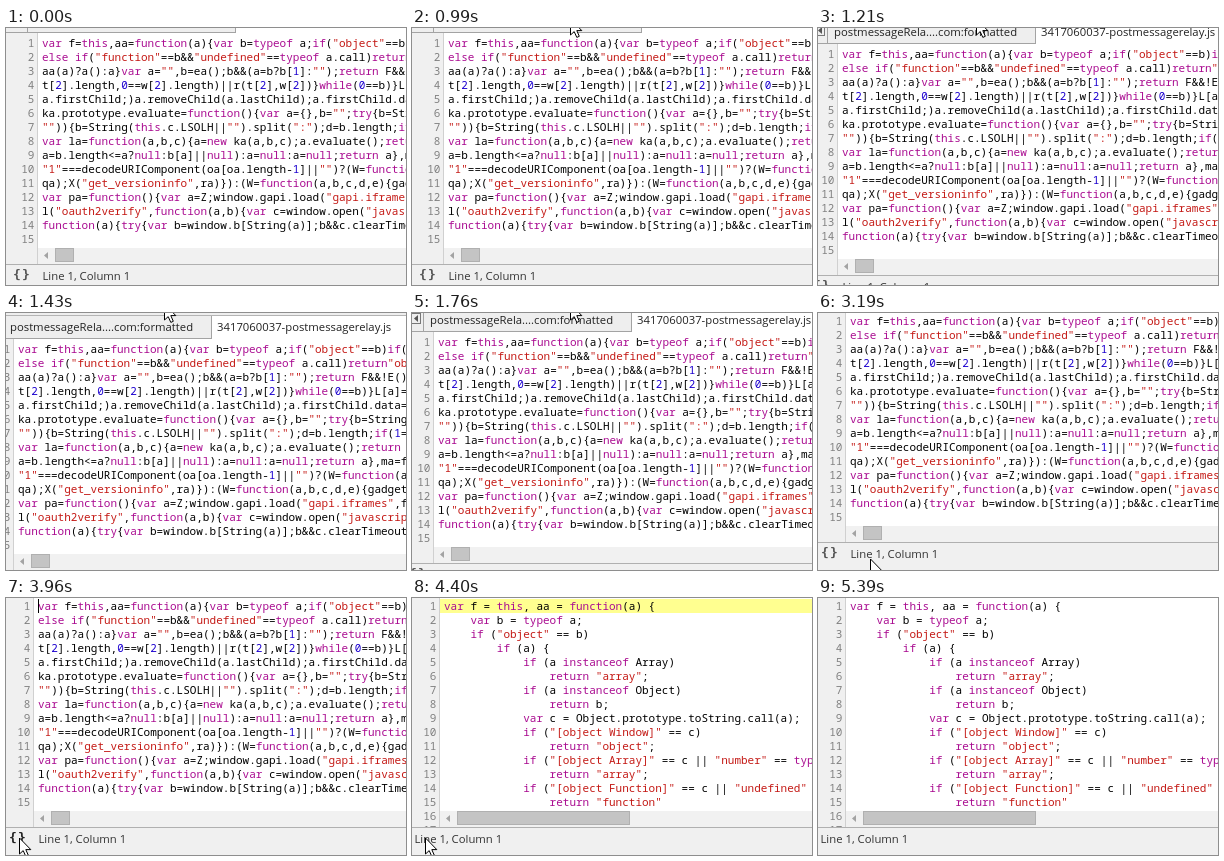
An HTML page with a canvas for the animation above (5.5 s loop, 400 by 257 pixels).

```html
<!DOCTYPE html>
<html lang="en">
<head>
<meta charset="utf-8">
<title>Pretty print</title>
<style>
html, body { margin: 0; width: 100%; height: 100%; overflow: hidden; background: #fff; }
canvas { display: block; width: 400px; height: 257px; }
</style>
</head>
<body>
<canvas id="stage" width="400" height="257"></canvas>
<script>
const ctx = document.getElementById('stage').getContext('2d');
const LOOP = 5500, STEP = 110, FORMAT_AT = 4180;
const ROW = 14, CODE_X = 36, BASELINE = 19, BAR_Y = 236;
const MONO = '11px "Noto Sans Mono", "DejaVu Sans Mono", monospace';
const UI = '11.3px "Open Sans", "Noto Sans", sans-serif';
const ICON = 'bold 13px "DejaVu Sans Mono", monospace';

const packed = `var f=this,aa=function(a){var b=typeof a;if("object"==b)if(
else if("function"==b&&"undefined"==typeof a.call)return"obj
aa(a)?a():a}var a="",b=ea();b&&(a=b?b[1]:"");return F&&!E()
t[2].length,0==w[2].length)||r(t[2],w[2])}while(0==b)}L[a]=
a.firstChild;)a.removeChild(a.lastChild);a.firstChild.data=
ka.prototype.evaluate=function(){var a={},b="";try{b=String
"")){b=String(this.c.LSOLH||"").split(":");d=b.length;if(1=
var la=function(a,b,c){a=new ka(a,b,c);a.evaluate();return a
a=b.length<=a?null:b[a]||null):a=null:a=null;return a},ma=f
"1"===decodeURIComponent(oa[oa.length-1]||"")?(W=function(a
qa);X("get_versioninfo",ra)}):(W=function(a,b,c,d,e){gadget
var pa=function(){var a=Z;window.gapi.load("gapi.iframes",f
l("oauth2verify",function(a,b){var c=window.open("javascrip
function(a){try{var b=window.b[String(a)];b&&c.clearTimeout`.split('\n');

const pretty = `var f = this, aa = function(a) {
    var b = typeof a;
    if ("object" == b)
        if (a) {
            if (a instanceof Array)
                return "array";
            if (a instanceof Object)
                return b;
            var c = Object.prototype.toString.call(a);
            if ("[object Window]" == c)
                return "object";
            if ("[object Array]" == c || "number" == typeof
                return "array";
            if ("[object Function]" == c || "undefined" !=
                return "function"`.split('\n');

const tokens = /("[^"]*"?)|\b(var|function|typeof|instanceof|if|else|return|try|while|this|null|new)\b|\b(\d+)\b|[^\s"\w]+|\w+/g;

// Each key is time, x, y
const camera = [[990, 0, 0], [1430, -24, 21], [1760, -10, 14], [2090, -4, -7]];
const trips = [
  [[440, 274, 230], [660, 232, 128], [880, 175, 18], [990, 158, -9], [2310, 158, -9],
   [2420, 205, 45], [2530, 230, 130], [2640, 147, 240]],
  [[3190, 52, 246], [3410, 30, 242], [3630, 13, 240], [4400, 13, 240], [4620, 11, 252]]
];

function at(keys, t) {
  if (t <= keys[0][0]) return keys[0].slice(1);
  for (let i = 1; i < keys.length; i++) {
    const [t0, x0, y0] = keys[i - 1], [t1, x1, y1] = keys[i];
    if (t <= t1) {
      const k = (t - t0) / (t1 - t0);
      return [Math.round(x0 + (x1 - x0) * k), Math.round(y0 + (y1 - y0) * k)];
    }
  }
  return keys[keys.length - 1].slice(1);
}

function box(x, y, w, h, color) {
  ctx.fillStyle = color;
  ctx.fillRect(x, y, w, h);
}

function label(text, x, y, font, color, align = 'left') {
  ctx.font = font;
  ctx.fillStyle = color;
  ctx.textAlign = align;
  ctx.fillText(text, x, y);
}

function shape(points, fill, stroke) {
  ctx.beginPath();
  points.forEach(([x, y]) => ctx.lineTo(x, y));
  ctx.closePath();
  ctx.fillStyle = fill;
  ctx.fill();
  if (stroke) {
    ctx.strokeStyle = stroke;
    ctx.lineWidth = 1;
    ctx.stroke();
  }
}

function codeLine(text, y) {
  ctx.font = MONO;
  const advance = ctx.measureText('0').width;
  for (const m of text.matchAll(tokens)) {
    const color = m[1] ? '#c41a16' : m[2] ? '#aa0d91' : m[3] ? '#1c00cf' : '#000';
    label(m[0], CODE_X + m.index * advance, y, MONO, color);
  }
}

function tabs() {
  box(-10, -40, 450, 45, '#eee');
  box(-10, -19, 450, 1, '#b4b4b4');
  box(230, -18, 200, 23, '#fff');
  box(-10, 4, 240, 1, '#a3a3a3');
  box(229, -18, 1, 23, '#a3a3a3');
  box(21, -18, 1, 22, '#a3a3a3');
  ctx.strokeStyle = '#777';
  ctx.lineWidth = 1;
  ctx.strokeRect(9.5, -13.5, 9, 10);
  shape([[12, -8.5], [16, -12], [16, -5]], '#555');
  label('postmessageRela....com:formatted', 28, -3, UI, '#222');
  label('3417060037-postmessagerelay.js', 235, -3, UI, '#222');
}

function editor(t, formatted) {
  box(-10, 5, 450, 231, '#fff');
  if (formatted) {
    const fade = Math.max(0, 1 - (t - FORMAT_AT) / 1200);
    box(32, 8, 400, ROW, `rgba(255,255,120,${fade})`);
  }
  (formatted ? pretty : packed).forEach((s, i) => codeLine(s, BASELINE + i * ROW));

  box(-10, 5, 41, 231, '#f0f0f0');
  box(31, 5, 1, 231, '#d0d0d0');
  const count = formatted ? 17 : 15;
  for (let i = 0; i < count; i++) {
    label(i + 1, 28.4, BASELINE + i * ROW, MONO, '#808080', 'right');
  }
  if (t >= 3850 && t < FORMAT_AT) box(CODE_X, 8, 1, ROW, t < 3960 ? '#888' : '#000');

  box(32, 220, 400, 16, '#f1f1f1');
  shape([[38, 227.5], [42, 224], [42, 231]], '#a3a3a3');
  const w = formatted ? 173 : 19;
  box(49, 220, w, 14, '#b0b0b0');
  box(50, 221, w - 2, 12, '#c4c4c4');
}

function statusBar(formatted, hover) {
  box(-10, BAR_Y, 450, 50, '#f0f0f0');
  box(-10, BAR_Y, 450, 1, '#b0b0b0');
  if (!formatted) {
    const color = hover ? '#222' : '#555';
    label('{', 7, 251, ICON, color);
    label('}', 16, 251, ICON, color);
  }
  label('Line 1, Column 1', formatted ? 6.5 : 36.5, 252, UI, '#333');
}

function pointer(x, y) {
  const arrow = [[0, 0], [0, 16], [3.7, 12.6], [6.3, 18.4], [8.8, 17.3], [6.3, 11.6], [11.3, 11.6]];
  shape(arrow.map(([px, py]) => [x + px + 0.5, y + py]), '#fff', '#000');
}

function draw(t) {
  const [dx, dy] = at(camera, t);
  const formatted = t >= FORMAT_AT;
  ctx.save();
  ctx.translate(dx, dy);
  tabs();
  editor(t, formatted);
  statusBar(formatted, t >= 3520);
  ctx.restore();
  const trip = trips.find(k => t >= k[0][0] && t <= k[k.length - 1][0]);
  if (trip) pointer(...at(trip, t));
}

const start = performance.now();
function tick() {
  const t = (performance.now() - start) % LOOP;
  draw(Math.floor(t / STEP) * STEP);
  requestAnimationFrame(tick);
}
tick();
</script>
</body>
</html>
```
